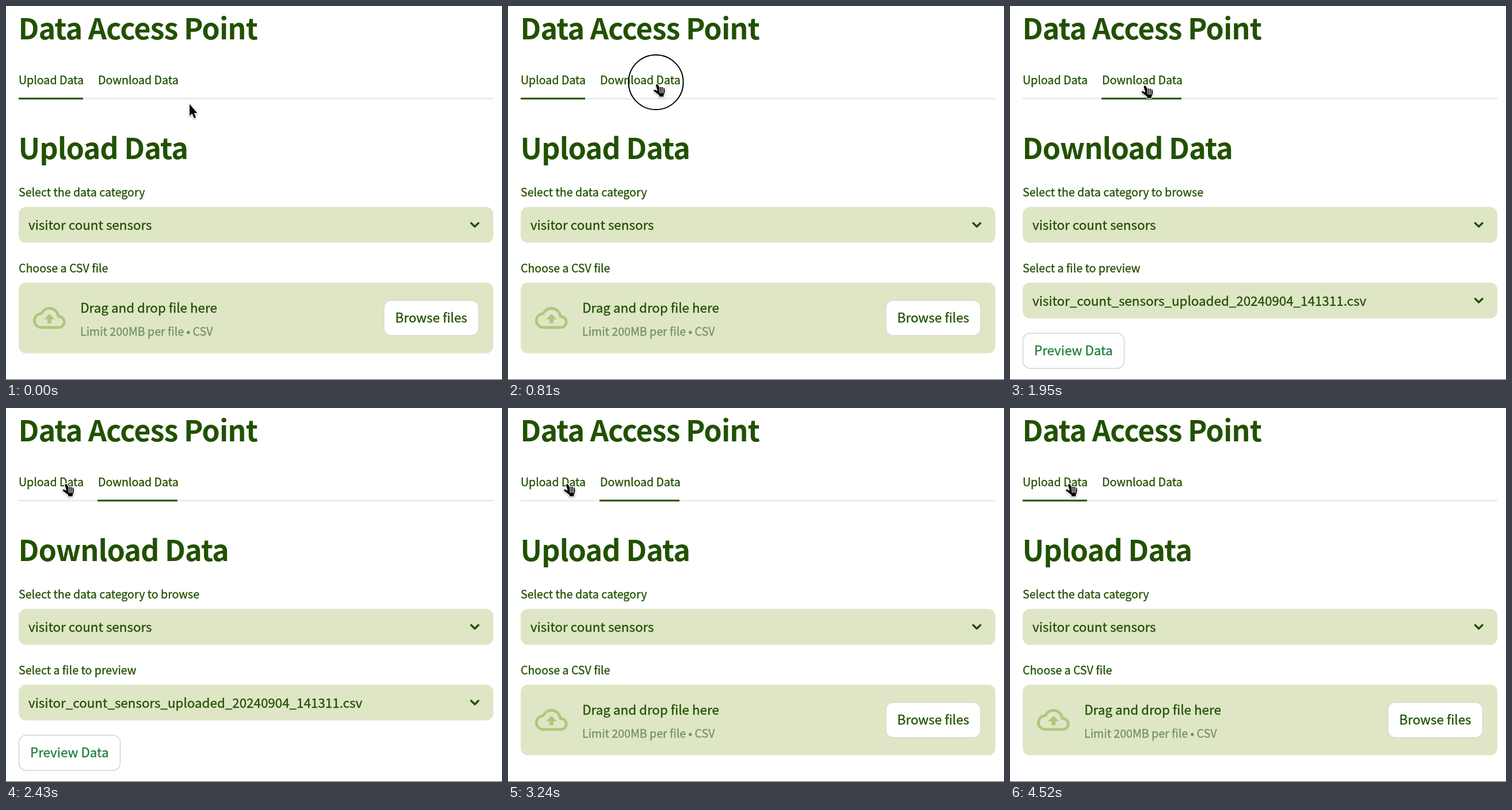
Write an HTML page with a canvas that moves like this. It is 862 px wide and 650 px high and loops after 4570 ms.

```html
<!DOCTYPE html>
<html lang="en">
<head>
<meta charset="utf-8">
<title>Data Access Point</title>
<style>
  html, body { margin: 0; width: 100%; height: 100%; overflow: hidden; background: #fff; }
  canvas { display: block; width: 862px; height: 650px; }
</style>
</head>
<body>
<canvas id="stage"></canvas>
<script>
const W = 862, H = 650;
const LOOP = 4570, STEPS = 96, STEP_MS = LOOP / STEPS;
const FONT = '"Noto Sans CJK JP", "Noto Sans CJK SC", "Noto Sans CJK", "Open Sans", sans-serif';
const INK = '#215100', PANEL = '#dfe6c6', ICON = '#b1c67c';
const SMALL = 19.58, BODY = 22.38, HEADING = 50.36;

// Times below are counted in steps of the loop.
const CLICKS = [[17, 20], [64, 67]];
const SHOW_DOWNLOAD = 20, SHOW_UPLOAD = 68;
const TABS = [{ x: 22, w: 112 }, { x: 159, w: 139 }];

const canvas = document.getElementById('stage');
const ctx = canvas.getContext('2d');
const ratio = window.devicePixelRatio || 1;
canvas.width = W * ratio;
canvas.height = H * ratio;

const CLOUD = new Path2D('M6 19H19A4 4 0 0 0 19.3 11.03L18.5 11 18.37 10.23A6.5 6.5 0 0 0 6.24 8.51L5.46 9.03A5 5 0 0 0 6 19Z');
const CLOUD_ARROW = new Path2D('M8 13h2.55v3h2.9v-3H16l-4-4z');
const ARROW = new Path2D('M0 0V20.6L4.5 16.6 7.9 24.6 11.1 23.2 7.9 15.6H13.4Z');
const HAND = new Path2D('M0 5.5Q.6 2.4 3.4 4.2L6.6 9.4Q8.2 7.4 9.6 9.2 11.2 7.8 12.6 9.6 15 9.2 15.4 12.2V16.5Q15.2 20 13.4 22V25H5.8V22.4Q2 19.5-3.4 15.4-4.4 12.8-1.6 13L2.8 15.2Z');
const HAND_LINES = new Path2D('M6.8 9.6L7.4 18.6M9.8 9.6L10.2 18.6M12.7 9.8L12.8 18.6');

const clamp = v => Math.min(1, Math.max(0, v));
const mix = (a, b, p) => a + (b - a) * p;
const smooth = p => p * p * (3 - 2 * p);
const easeOut = p => Math.sin(p * Math.PI / 2);
const quintic = p => p < .5 ? 16 * p ** 5 : 1 - (2 - 2 * p) ** 5 / 2;

// A hairline outline gives the regular weight its slightly heavier look.
function text(str, x, y, size, color = INK) {
  ctx.font = `400 ${size}px ${FONT}`;
  ctx.letterSpacing = '0px';
  ctx.fillStyle = ctx.strokeStyle = color;
  ctx.lineWidth = .35;
  ctx.lineJoin = 'round';
  ctx.fillText(str, x, y);
  ctx.strokeText(str, x, y);
}

function heading(str, y) {
  ctx.font = `700 ${HEADING}px ${FONT}`;
  ctx.letterSpacing = '-0.95px';
  ctx.fillStyle = INK;
  ctx.fillText(str, 21.5, y);
}

function box(x, y, w, h, fill, border) {
  ctx.beginPath();
  ctx.roundRect(x, y, w, h, 12.5);
  ctx.fillStyle = fill;
  ctx.fill();
  if (border) {
    ctx.strokeStyle = border;
    ctx.lineWidth = 1.5;
    ctx.stroke();
  }
}

function select(label, value, y) {
  text(label, 22, y - 18, SMALL);
  box(22, y, 825, 62.3, PANEL);
  text(value, 39, y + 39.7, BODY);
  ctx.beginPath();
  ctx.moveTo(808.4, y + 28);
  ctx.lineTo(814.7, y + 34.2);
  ctx.lineTo(821, y + 28);
  ctx.strokeStyle = INK;
  ctx.lineWidth = 3.5;
  ctx.lineCap = 'round';
  ctx.lineJoin = 'round';
  ctx.stroke();
}

function drawCloud() {
  ctx.save();
  ctx.translate(47, 513.5);
  ctx.scale(2.375, 2.375);
  ctx.strokeStyle = ctx.fillStyle = ICON;
  ctx.lineWidth = 2;
  ctx.stroke(CLOUD);
  ctx.fill(CLOUD_ARROW);
  ctx.restore();
}

function drawUpload() {
  heading('Upload Data', 266);
  select('Select the data category', 'visitor count sensors', 349.3);
  text('Choose a CSV file', 22, 462.8, SMALL);
  box(22, 480.8, 825, 122.8, PANEL);
  drawCloud();
  text('Drag and drop file here', 129.2, 533.2, BODY);
  text('Limit 200MB per file • CSV', 129, 573, SMALL, '#749260');
  box(656.8, 511.8, 164.6, 61, '#fff', '#d5dccb');
  text('Browse files', 676.5, 549.8, BODY);
}

function drawDownload() {
  heading('Download Data', 266);
  select('Select the data category to browse', 'visitor count sensors', 349.3);
  select('Select a file to preview', 'visitor_count_sensors_uploaded_20240904_141311.csv', 480.8);
  box(22.5, 568.8, 176, 61, '#fff', '#d2d4d2');
  text('Preview Data', 42, 607, BODY, '#1d7f3c');
}

function drawTabs(k) {
  const slide = start => quintic(clamp(((k - start) * STEP_MS - 12) / 400));
  const p = slide(SHOW_DOWNLOAD) - slide(SHOW_UPLOAD);
  text('Upload Data', 22, 136, SMALL);
  text('Download Data', 160, 136, SMALL);
  ctx.fillStyle = '#ebece5';
  ctx.fillRect(22, 159.4, 825, 3);
  ctx.fillStyle = INK;
  ctx.fillRect(mix(TABS[0].x, TABS[1].x, p), 159.4, mix(TABS[0].w, TABS[1].w, p), 3);
}

function pointerAt(k) {
  if (k < 41) {
    const p = smooth(clamp(k / 8));
    return [mix(319, 257, p), mix(170.5, 132.5, p)];
  }
  const p = easeOut(clamp((k - 41) / 11));
  return [mix(232.5, 101, p), mix(135, 128.5, p)];
}

function drawPointer(k) {
  const [x, y] = pointerAt(k);
  const overTab = y < 160 && TABS.some(tab => x >= tab.x && x <= tab.x + tab.w);
  const shape = overTab ? HAND : ARROW;

  if (CLICKS.some(([from, to]) => k >= from && k < to)) {
    ctx.beginPath();
    ctx.arc(x, y, 47.6, 0, Math.PI * 2);
    ctx.strokeStyle = '#000';
    ctx.lineWidth = 2;
    ctx.stroke();
  }

  ctx.save();
  ctx.translate(x, y);
  ctx.lineJoin = 'round';
  ctx.strokeStyle = '#fff';
  ctx.lineWidth = 2.6;
  ctx.shadowColor = 'rgba(0,0,0,.35)';
  ctx.shadowBlur = 3 * ratio;
  ctx.shadowOffsetY = ratio;
  ctx.stroke(shape);
  ctx.shadowColor = 'transparent';
  ctx.fillStyle = '#000';
  ctx.fill(shape);
  if (overTab) {
    ctx.lineWidth = 1.2;
    ctx.stroke(HAND_LINES);
  }
  ctx.restore();
}

function draw(now) {
  const k = Math.floor((now % LOOP + 3) / STEP_MS) % STEPS;
  ctx.setTransform(ratio, 0, 0, ratio, 0, 0);
  ctx.fillStyle = '#fff';
  ctx.fillRect(0, 0, W, H);
  heading('Data Access Point', 58);
  drawTabs(k);
  if (k >= SHOW_DOWNLOAD && k < SHOW_UPLOAD) drawDownload();
  else drawUpload();
  ctx.fillStyle = '#777';
  ctx.fillRect(0, 648.7, W, 1.3);
  drawPointer(k);
}

const start = performance.now();
function tick() {
  draw(performance.now() - start);
  requestAnimationFrame(tick);
}
tick();
</script>
</body>
</html>
```
